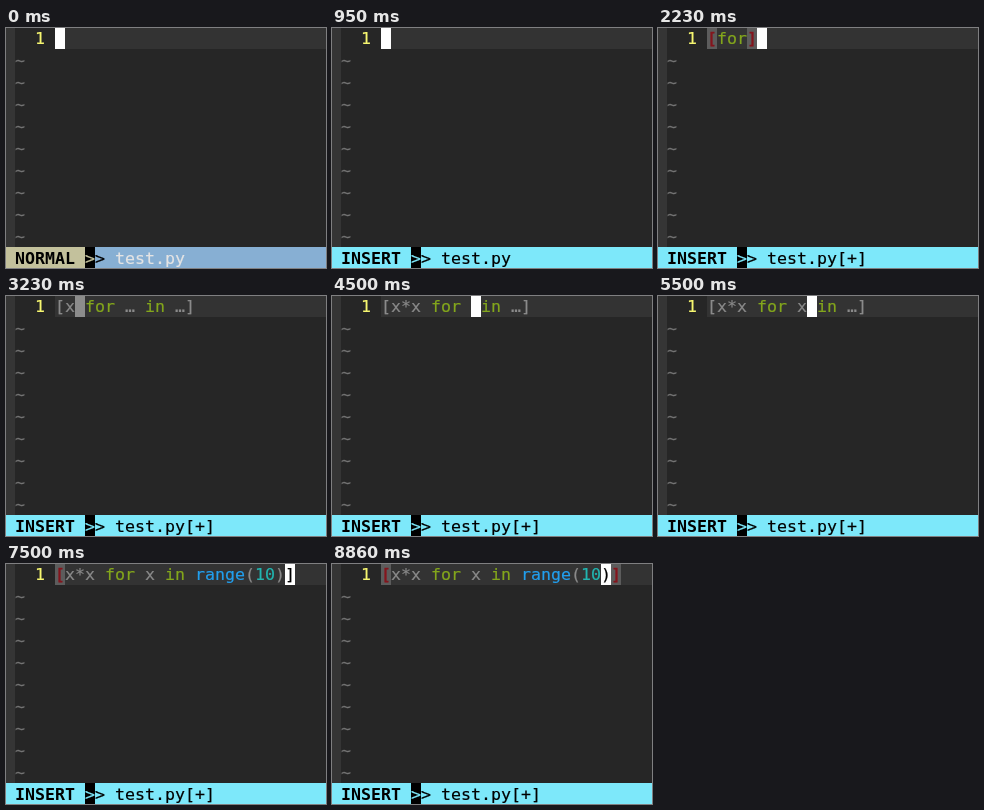
Recreate the animation shown at these times as an HTML page. Size 320 px wide and 240 px high, loop 8.9 s.

```html
<!DOCTYPE html>
<html lang="en">
<head>
<meta charset="utf-8">
<title>Editor snippet</title>
<style>
html, body { margin: 0; width: 100%; height: 100%; overflow: hidden; background: #262626; }
#stage {
  position: relative; width: 320px; height: 240px; overflow: hidden; background: #262626;
  font: 16.61px/22px "DejaVu Sans Mono", monospace; font-variant-ligatures: none;
  white-space: pre; color: #8a8a8a; -webkit-text-stroke: .2px;
}
#stage div { position: absolute; }
#edge { left: 0; top: 0; width: 9px; height: 219px; background: #353535; }
#line {
  left: 0; top: -1px; width: 311px; height: 22px; padding-left: 9px;
  background: linear-gradient(90deg, #262626 49px, #333 49px);
}
#line, #status { line-height: 24px; }
#tildes { left: 9px; top: 22px; color: #747474; }
#bar, #mode { left: 0; top: 219px; height: 22px; }
#bar { width: 320px; }
#mode { width: 79px; }
#status { left: 9px; top: 219px; color: #000; }
#name { -webkit-text-stroke: 0; }
#arrow { background: #000; }
#line span, #arrow { display: inline-block; width: 10px; height: 22px; vertical-align: top; }
#line .num { color: #f6f670; }
.key { color: #83a61c; }
.fn { color: #229fee; }
.int { color: #22b5b0; }
#line .match { background: #5c5c5c; color: #84141c; -webkit-text-stroke: .5px; }
#line .cursor { background: #fff; color: #000; }
#line .dim { background: #8c8c8c; color: #000; }
</style>
</head>
<body>
<div id="stage">
  <div id="line"></div>
  <div id="edge"></div>
  <div id="tildes"></div>
  <div id="bar"></div>
  <div id="mode"></div>
  <div id="status"><b id="name"></b> <span id="arrow">&gt;</span>&gt; <span id="file"></span></div>
</div>
<script>
const LOOP = 8900, FLASH = 45;
const $ = id => document.getElementById(id);
const CYAN = '#7de8fa', BLUE = '#87afd3', SAND = '#c3c19c';

// Snippet expansion and the two jumps to the next placeholder
const EXPAND = 2440, JUMP1 = 4250, JUMP2 = 5600;

// [start ms, text with | before the cursor cell, flag]
const steps = [
  [0, '|'],
  [1040, '[|'],
  [1200, '[f|'],
  [1330, '[fo|'],
  [1460, '[for|'],
  [1640, '[for]|'],
  [EXPAND, '[| for … in …]'],
  [3230, '[x| for … in …]', 'dim'],
  [3270, '[x| for … in …]'],
  [3400, '[x*| for … in …]'],
  [3560, '[x*x| for … in …]'],
  [JUMP1, '[x*x for | in …]'],
  [4930, '[x*x for x| in …]'],
  [JUMP2, '[x*x for x in |]'],
  [5800, '[x*x for x in r|]'],
  [5920, '[x*x for x in ra|]'],
  [6040, '[x*x for x in ran|]'],
  [6150, '[x*x for x in rang|]'],
  [6410, '[x*x for x in range|]'],
  [6600, '[x*x for x in range(|]'],
  [6780, '[x*x for x in range(1|]'],
  [6910, '[x*x for x in range(10|]'],
  [7110, '[x*x for x in range(10)|]'],
  [8860, '[x*x for x in range(10|)]', 'pair']
];

// [start ms, insert mode, width of the redrawn bar]
const modes = [
  [0, false], [910, true, 180], [950, true, 320],
  ...[EXPAND, JUMP1, JUMP2].flatMap(t => [[t - FLASH, false], [t, true, 320]])
];

const at = (list, t) => list.findLast(e => e[0] <= t);

function drawLine([, src, flag]) {
  const cur = src.indexOf('|');
  const text = src.replace('|', '');
  const cls = Array(text.length + 1).fill('');
  for (const m of text.matchAll(/\b(for|in|range|\d+)\b/g)) {
    const kind = m[0] === 'range' ? 'fn' : /\d/.test(m[0]) ? 'int' : 'key';
    cls.fill(kind, m.index, m.index + m[0].length);
  }
  const near = /[[\]]/.test(text.slice(Math.max(0, cur - 1), cur + 1));
  if (text.endsWith(']') && (near || flag === 'pair')) {
    cls[0] = cls[text.length - 1] = 'match';
  }
  cls[cur] = flag === 'dim' ? 'dim' : 'cursor';
  const cells = [...text + ' '].map((c, i) => `<span class="${cls[i]}">${c}</span>`);
  $('line').innerHTML = '  <span class="num">1</span> ' + cells.join('');
}

function drawStatus([, insert, width]) {
  $('bar').style.background = insert
    ? `linear-gradient(90deg, ${CYAN} ${width}px, ${BLUE} ${width}px)` : BLUE;
  $('mode').style.background = insert ? CYAN : SAND;
  $('arrow').style.color = insert ? CYAN : SAND;
  $('name').textContent = insert ? 'INSERT' : 'NORMAL';
  $('file').style.color = insert ? '#000' : '#e4e4e4';
}

$('tildes').textContent = Array(9).fill('~').join('\n');
const start = performance.now();
let step, mode, name;

function tick() {
  const t = (performance.now() - start) % LOOP;
  const s = at(steps, t), m = at(modes, t);
  if (s !== step) drawLine(step = s);
  if (m !== mode) drawStatus(mode = m);
  const file = 'test.py' + (s === steps[0] ? '' : '[+]');
  if (file !== name) $('file').textContent = name = file;
  requestAnimationFrame(tick);
}
tick();
</script>
</body>
</html>
```
